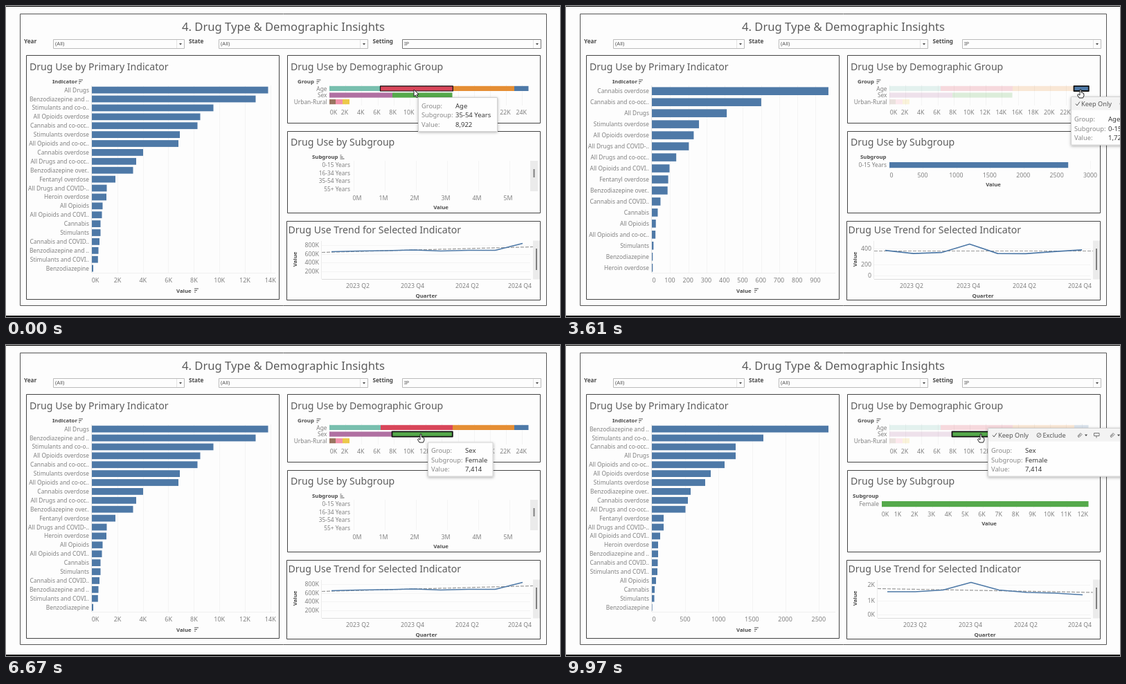
An HTML page with a canvas that plays this animation: 800 by 450 pixels, repeating every 10 s.

```html
<!DOCTYPE html>
<html lang="en">
<head>
<meta charset="utf-8">
<title>Drug Type &amp; Demographic Insights</title>
<style>
html, body { margin: 0; width: 100%; height: 100%; overflow: hidden; background: #fdfdfd; }
canvas { display: block; width: 800px; height: 450px; }
</style>
</head>
<body>
<canvas id="stage" width="800" height="450"></canvas>
<script>
const ctx = document.getElementById('stage').getContext('2d');
const LOOP = 10000;
const BLUE = '#4e79a7', GREEN = '#55a94b', GRID = '#f4f4f4', GRAY = '#808080', DARK = '#4a4a4a';

const NAMES = {
  AD: 'All Drugs', BA: 'Benzodiazepine and ..', SC: 'Stimulants and co-o..', OO: 'All Opioids overdose',
  CC: 'Cannabis and co-occ..', SO: 'Stimulants overdose', OC: 'All Opioids and co-oc..', CO: 'Cannabis overdose',
  DC: 'All Drugs and co-occ..', BO: 'Benzodiazepine over..', FO: 'Fentanyl overdose', DV: 'All Drugs and COVID-..',
  HO: 'Heroin overdose', AO: 'All Opioids', OV: 'All Opioids and COVI..', CA: 'Cannabis', ST: 'Stimulants',
  CV: 'Cannabis and COVID..', SV: 'Stimulants and COVI..', BZ: 'Benzodiazepine'
};

// An axis has a first label, then evenly spaced ones.
const axis = (base, first, second, gap, count, step, unit = '') => ({ base, first, second, gap, count, step, unit });

const VIEWS = {
  all: {
    rows: 'AD BA SC OO CC SO OC CO DC BO FO DV HO AO OV CA ST CV BA SV BZ',
    bars: [254.5, 236.5, 175.5, 156.5, 152.5, 127, 125, 74, 64, 59.5, 34, 21.5, 21, 15.5, 14.5, 12.5, 12.5, 11, 9.5, 8.8, 2],
    axis: axis(124, 129, 161, 36.8, 8, 2, 'K'),
    sub: { title: 442, right: 497, rows: ['0-15 Years', '16-34 Years', '35-54 Years', '55+ Years'], axis: axis(502, 507, 545, 45, 6, 1, 'M'), axisY: 278, value: 628 },
    trend: { x: [470, 746], y: [355.5, 354.5, 354, 353, 354.5, 353.5, 353.5, 343.5], dash: [356.5, 348.5], left: 456,
      ticks: [['800K', 346], ['600K', 359], ['400K', 371], ['200K', 384]], quarters: [508, 587, 666, 742], name: 607 }
  },
  child: {
    rows: 'CO CC AD SO OO DV DC OV FO BO CV CA AO OC ST BZ HO',
    bars: [255, 149, 100.5, 58, 50, 45, 25, 20, 19, 18.5, 10, 7, 4, 4, 1, 0, 0],
    axis: axis(124, 127, 150, 26.25, 10, 100),
    sub: { title: 425, right: 463, rows: ['0-15 Years'], axis: axis(467, 470, 515, 48.4, 7, 500), axisY: 245, value: 617, color: BLUE },
    trend: { x: [460, 745], y: [353.5, 358.5, 357, 343.5, 358.5, 359, 355.5, 354], dash: [354.5, 354.5], left: 445,
      ticks: [['400', 351], ['200', 374], ['0', 390]], quarters: [499, 581, 662, 742], name: 602 }
  },
  female: {
    rows: 'BA SC CC AD OC OO SO BO CO DC FO DV OV HO BA CV SV AO CA ST BZ',
    bars: [255, 161, 121, 121, 105, 85, 77, 56, 52, 48.5, 17, 17, 12, 9, 9, 8.5, 8, 6, 4, 3.5, 0.6],
    axis: axis(124, 127, 172, 48.2, 6, 500),
    sub: { title: 414, right: 452, rows: ['Female'], axis: axis(456, 461, 479, 24.3, 13, 1, 'K'), axisY: 245, value: 611, color: GREEN },
    trend: { x: [464, 746], y: [357, 357, 354.5, 343.5, 354.5, 358, 359, 361.5], dash: [352.5, 358], left: 450,
      ticks: [['2K', 347], ['1K', 370], ['0K', 390]], quarters: [504, 584, 664, 742], name: 605 }
  }
};
const LOADING_AXIS = axis(124, 127, 161, 37.8, 7, 2000);

// Stacked bars: left, right, colour
const STACKS = {
  Age: [[467, 541, '#78bfae'], [541, 645, '#d8465a'], [645, 734, '#e58e34'], [734, 754.5, BLUE]],
  Sex: [[467, 558, '#b070a2'], [558, 644.5, GREEN]],
  'Urban-Rural': [[467, 476, '#9a7560'], [476, 486, '#f291aa'], [486, 496, '#ecc94a']]
};

const TIPS = {
  adult: ['Age', '35-54 Years', '8,922'],
  young: ['Age', '16-34 Years', '7,742'],
  child: ['Age', '0-15 Years', '1,726'],
  female: ['Sex', 'Female', '7,414']
};

// Cursor stops: time, x, y
const PATH = [[0, 589, 121], [450, 589, 121], [850, 727, 119], [1250, 727, 119], [1600, 743, 121],
  [6240, 743, 121], [6520, 599, 129], [LOOP, 599, 129]];

const clamp = v => Math.max(0, Math.min(1, v));
const lerp = (a, b, p) => a + (b - a) * p;
const ease = p => p * p * (3 - 2 * p);
const phase = (t, start, end) => ease(clamp((t - start) / (end - start)));

function text(str, x, y, { size = 8.4, weight = 400, color = GRAY, align = 'left' } = {}) {
  ctx.font = `${weight} ${size}px "Noto Sans", "Open Sans", sans-serif`;
  ctx.fillStyle = color;
  ctx.textAlign = align;
  ctx.textBaseline = 'alphabetic';
  ctx.fillText(str, x, y + size * 0.36);
}
const bold = (str, x, y, align = 'left', size = 7.8) => text(str, x, y, { size, weight: 600, color: DARK, align });
const heading = (str, x, y, size = 14.1, align = 'left') => text(str, x, y, { size, weight: 300, color: '#5c5c5c', align });

function box(x, y, r, b, color) {
  ctx.fillStyle = color;
  ctx.fillRect(x, y, r - x, b - y);
}
function frame(x, y, r, b, color = '#444', width = 1) {
  ctx.strokeStyle = color;
  ctx.lineWidth = width;
  ctx.strokeRect(x, y, r - x, b - y);
}
function line(points, color, width = 1, dash = []) {
  ctx.beginPath();
  points.forEach(([x, y]) => ctx.lineTo(x, y));
  ctx.strokeStyle = color;
  ctx.lineWidth = width;
  ctx.lineJoin = 'round';
  ctx.setLineDash(dash);
  ctx.stroke();
  ctx.setLineDash([]);
}
function shape(points, fill, stroke) {
  ctx.beginPath();
  points.forEach(([x, y]) => ctx.lineTo(x, y));
  ctx.closePath();
  ctx.fillStyle = fill;
  ctx.fill();
  if (stroke) {
    ctx.strokeStyle = stroke;
    ctx.lineWidth = 1;
    ctx.stroke();
  }
}
const arrowDown = (x, y, s = 2) => shape([[x - s, y - 1], [x + s, y - 1], [x, y + 1.5]], '#444');

function sortIcon(x, y, rising = false) {
  [6, 4, 2].forEach((w, i) => {
    const len = rising ? 8 - w : w;
    line([[x, y - 2.5 + i * 2.5], [x + len, y - 2.5 + i * 2.5]], '#555', 1);
  });
}

function drawAxis(a, y, top, bottom, size = 9) {
  for (let i = 0; i < a.count; i++) {
    const g = Math.round(a.base + a.gap * i) + 0.5;
    line([[g, top], [g, bottom]], GRID);
    text(i * a.step + a.unit, i ? a.second + a.gap * (i - 1) : a.first, y, { size, align: 'center' });
  }
}

function drawChrome(t) {
  box(0, 0, 800, 450, '#fdfdfd');
  box(0, 0, 800, 1, '#000');
  box(0, 448, 800, 450, '#000');
  frame(20.5, 11.5, 780.5, 433.5, '#555');
  frame(29.5, 71.5, 394.5, 424.5);
  frame(406.5, 71.5, 771.5, 169.5);
  frame(406.5, 181.5, 771.5, 299.5);
  frame(405.5, 311.5, 771.5, 425.5);
  heading('4. Drug Type & Demographic Insights', 400.5, 29.8, 16.65, 'center');
  [['Year', 26, 68.5, 257.5, '(All)'], ['State', 264, 307.5, 522.5, '(All)'], ['Setting', 529.5, 572.5, 772.5, 'IP']]
    .forEach(([name, x, left, right, value], i) => {
      bold(name, x, 51, 'left', 8.2);
      frame(left, 48.5, right, 61.5, i === 2 && t < 1600 ? '#777' : '#bbb');
      text(value, left + 2.5, 54.5, { size: 7.6, color: '#555' });
      line([[right - 11, 49], [right - 11, 61]], '#e4e4e4');
      arrowDown(right - 5.5, 55);
    });
  heading('Drug Use by Primary Indicator', 34, 88);
  heading('Drug Use by Demographic Group', 411, 88);
  heading('Drug Use by Subgroup', 411, 197);
  heading('Drug Use Trend for Selected Indicator', 407.5, 324);
}

function drawIndicators(from, to, p) {
  bold('Indicator', 67, 109);
  sortIcon(105, 109.5);
  const a = p > 0 || from === to ? to.axis : LOADING_AXIS;
  drawAxis(a, 396.5, 115, 386);
  line([[123.5, 115], [123.5, 386]], '#e8e8e8');
  line([[124, 386.5], [389, 386.5]], '#efefef');
  const rows = to.rows.split(' ');
  const few = rows.length < 20;
  const top = few ? 123.2 : 121.6, gap = few ? 15.97 : 12.9, h = few ? 11.6 : 9.8;
  rows.forEach((key, i) => {
    const y = top + gap * i;
    text(NAMES[key], 120, y, { align: 'right' });
    const w = lerp(from.bars[i] || 0, to.bars[i], p);
    box(124, y - h / 2, 124 + w, y + h / 2, BLUE);
  });
  bold('Value', 246, 412);
  sortIcon(272, 411.5);
}

function drawGroups(hover, selected) {
  bold('Group', 421, 109);
  sortIcon(448.5, 109.5);
  drawAxis(axis(467, 473, 489, 23.2, 13, 2, 'K'), 153.5, 114, 144, 8.8);
  Object.entries(STACKS).forEach(([name, parts], row) => {
    const y = 115.8 + row * 9.6;
    text(name, 463.5, y + 3.7, { align: 'right' });
    parts.forEach(([x, r, color], i) => {
      ctx.globalAlpha = selected && selected !== name + i ? 0.2 : 1;
      box(x, y, r, y + 7.2, color);
      ctx.globalAlpha = 1;
    });
  });
  if (!hover) return;
  const row = hover.startsWith('Age') ? 0 : 1;
  const [x, r] = Object.values(STACKS)[row][+hover.slice(-1)];
  const y = 115.8 + row * 9.6;
  frame(x - 0.5, y, r + 0.3, y + 7.2, '#111', hover === 'Age1' || hover === 'Age2' ? 1.2 : 1.8);
}

function scrollbar(x, r, y, b, thumbTop, thumbBottom) {
  box(x, y, r, b, '#ebebeb');
  box((x + r) / 2 - 1, thumbTop, (x + r) / 2 + 1, thumbBottom, '#808080');
}

function drawSubgroup({ sub }, p) {
  bold('Subgroup', sub.title, 218);
  const many = sub.rows.length > 1;
  sub.rows.forEach((name, i) => text(name, sub.right, 230.3 + i * 11.4, { align: 'right' }));
  if (!many && p === 0) {
    for (let x = 503.5; x < 756; x += 41.8) line([[x, 225], [x, 267]], GRID);
    text('0' + sub.axis.unit, sub.axis.first, 245, { size: 8.8, align: 'center' });
    text('1', 499.5, 245, { size: 8.8, align: 'center' });
    return;
  }
  drawAxis(sub.axis, sub.axisY, 224, many ? 268 : 236, 8.8);
  bold('Value', sub.value, sub.axisY + 13, 'center');
  if (many) {
    sortIcon(482.5, 218.5, true);
    scrollbar(757, 768, 224, 268, 236, 248);
  } else {
    box(sub.axis.base, 226, lerp(sub.axis.base, 754.5, p), 234.2, sub.color);
  }
}

function drawTrend(from, to, p) {
  const old = from.trend, now = to.trend;
  const waiting = from !== to && p === 0;
  const shown = waiting ? old : now;
  shown.ticks.forEach(([name, y]) => {
    line([[shown.left, y + 0.5], [757, y + 0.5]], GRID);
    text(name, shown.left - 4, y, { size: 8.8, align: 'right' });
  });
  line([[shown.left, 395.5], [758, 395.5]], '#dcdcdc');
  line([[shown.left - 0.5, 340], [shown.left - 0.5, 395]], '#ececec');
  line([[shown.left, now.dash[0]], [761, now.dash[1]]], '#999', 1.2, [5, 2]);
  const left = lerp(old.x[0], now.x[0], p), right = lerp(old.x[1], now.x[1], p);
  line(now.y.map((y, i) => [lerp(left, right, i / 7), lerp(old.y[i], y, p)]), BLUE, 1.7);
  ctx.save();
  ctx.beginPath();
  ctx.rect(440, 398, waiting ? 315 : 325, 16);
  ctx.clip();
  ['2023 Q2', '2023 Q4', '2024 Q2', '2024 Q4']
    .forEach((name, i) => text(name, now.quarters[i], 405, { size: 8.7, align: 'center' }));
  ctx.restore();
  bold('Quarter', waiting ? 602 : now.name, 419.5, 'center');
  ctx.save();
  ctx.translate(417, 366.5);
  ctx.rotate(-Math.PI / 2);
  bold('Value', 0, 0, 'center');
  ctx.restore();
  scrollbar(761, 771, 339.5, 395.5, 351, 382);
}

function clip(x, y) {
  line([[x - 3, y + 1], [x + 1, y - 3], [x + 3, y - 1], [x - 1, y + 3], [x - 3, y + 2], [x + 1, y - 1]], '#777');
}

function drawTools(x, y) {
  box(x, y - 9, 800, y + 9, '#f3f3f3');
  line([[x + 6, y], [x + 8, y + 2.5], [x + 12, y - 3]], '#555', 1);
  text('Keep Only', x + 14, y, { size: 9.2, color: '#555' });
  ctx.beginPath();
  ctx.arc(x + 73, y, 3, 0, 7);
  ctx.strokeStyle = '#777';
  ctx.stroke();
  line([[x + 71, y + 2], [x + 75, y - 2]], '#777');
  text('Exclude', x + 78.5, y, { size: 9.2, color: '#555' });
  clip(x + 132, y);
  arrowDown(x + 141, y);
  frame(x + 152.5, y - 3, x + 160, y + 1, '#777');
  line([[x + 156, y + 1], [x + 156, y + 4]], '#777');
  clip(x + 179, y);
  arrowDown(x + 188, y);
}

function drawTip({ key, x, y, right, tools }) {
  const top = tools ? y - 20.5 : y;
  ctx.save();
  ctx.shadowColor = 'rgba(0,0,0,.3)';
  ctx.shadowBlur = 4;
  ctx.shadowOffsetY = 1;
  box(x, top, right, y + 50, '#fefefe');
  ctx.restore();
  frame(x + 0.5, top + 0.5, right - 0.5, y + 49.5, '#d2d2d2');
  if (tools) drawTools(x + 1, y - 10);
  ['Group:', 'Subgroup:', 'Value:'].forEach((name, i) => {
    const rowY = y + 12.3 + i * 13.6;
    text(name, x + 5, rowY, { size: 9.3, color: '#888' });
    text(TIPS[key][i], x + 54, rowY, { size: 9.5, weight: 500, color: '#3a3a3a' });
  });
}

function tipAt(t) {
  if (t < 500) return { key: 'adult', x: 595, y: 132, right: 710 };
  if (t >= 760 && t < 1450) return { key: 'young', x: 736, y: 131, right: 852 };
  if (t >= 1600 && t < 3000) return { key: 'child', x: 753, y: 131, right: 860 };
  if (t >= 3000 && t < 6240) return { key: 'child', x: 729, y: 151.5, right: 930, tools: true };
  if (t >= 6560) return { key: 'female', x: 609, y: 140.5, right: t < 7700 ? 703.5 : 815, tools: t >= 8450 };
  return null;
}

function hoverAt(t) {
  if (t < 600) return 'Age1';
  if (t < 1450) return 'Age2';
  if (t < 6300) return 'Age3';
  return t < 6480 ? '' : 'Sex1';
}

function drawCursor(t) {
  const i = PATH.findIndex((stop, n) => n && t <= stop[0]);
  const [t0, x0, y0] = PATH[i - 1], [t1, x1, y1] = PATH[i];
  const p = phase(t, t0, t1);
  const x = lerp(x0, x1, p), y = lerp(y0, y1, p);
  const arrow = [[0, 0], [0, 10], [2.3, 8], [4, 11.5], [5.6, 10.8], [4, 7.3], [7, 7]];
  const hand = [[-1, 0], [1, 0], [1, 4], [4.5, 5.2], [5, 8.5], [3.5, 12], [-2, 12], [-4.5, 8], [-3.5, 6.5], [-1, 8]];
  shape((t < 500 ? arrow : hand).map(([dx, dy]) => [x + dx, y + dy]), '#fff', '#222');
}

function viewAt(t) {
  const { all, child, female } = VIEWS;
  if (t < 3000) return [all, all, 1];
  if (t < 6240) return [all, child, phase(t, 3250, 3700)];
  if (t < 7700) return [child, all, phase(t, 6230, 6520)];
  return [all, female, phase(t, 8000, 8450)];
}

function draw(t) {
  const [from, to, p] = viewAt(t);
  const selected = to === VIEWS.child ? 'Age3' : to === VIEWS.female ? 'Sex1' : '';
  drawChrome(t);
  drawIndicators(from, to, p);
  drawGroups(hoverAt(t), selected);
  drawSubgroup(to, p);
  drawTrend(from, to, p);
  const tip = tipAt(t);
  if (tip) drawTip(tip);
  drawCursor(t);
}

const start = performance.now();
function tick() {
  draw((performance.now() - start) % LOOP);
  requestAnimationFrame(tick);
}
tick();
</script>
</body>
</html>
```
